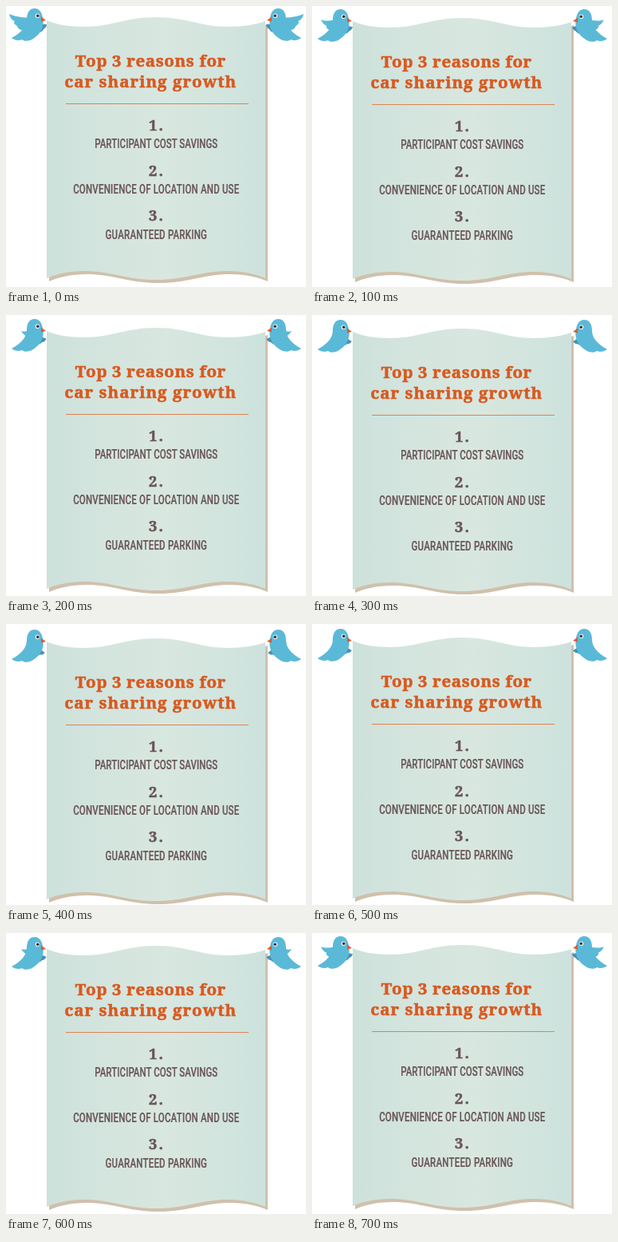
Recreate the animation shown at these times as an HTML page. Size 376 by 352 pixels, loop 800 ms.

```html
<!DOCTYPE html>
<html lang="en">
<head>
<meta charset="utf-8">
<title>Car sharing scroll</title>
<style>
  html, body { margin: 0; width: 100%; height: 100%; overflow: hidden; background: #fff; }
  svg { display: block; width: 376px; height: 352px; }
  text { text-anchor: middle; }
  .slab { font-family: "Noto Serif", "Liberation Serif", serif; font-weight: 700; }
  .title { font-size: 20.5px; fill: #d9591f; stroke: #d9591f; stroke-width: .6px; }
  .num { font-size: 18.5px; letter-spacing: 2px; fill: #6a5558; stroke: #6a5558; stroke-width: .5px; }
  .reason {
    font-family: Roboto, "Liberation Sans", sans-serif; font-weight: 500; font-size: 16.5px;
    fill: #6a5558; stroke: #6a5558; stroke-width: .25px;
  }
</style>
</head>
<body>
<svg viewBox="0 0 376 352">
  <defs>
    <linearGradient id="sheen">
      <stop offset="0" stop-color="#cde1db"/>
      <stop offset=".3" stop-color="#d4e5de"/>
      <stop offset=".55" stop-color="#d8e7df"/>
      <stop offset="1" stop-color="#cde2dd"/>
    </linearGradient>
    <path id="sheet" d="M51 18 C62 23 78 26 98 26 C132 26 150 14 188 14
      C226 14 244 26 278 26 C298 26 314 23 325 19
      V341 C314 336 298 332 278 332 C244 332 226 343 188 343
      C150 343 132 332 98 332 C78 332 62 336 51 341Z"/>
    <g id="bird">
      <path id="farWing" fill="#4a90b5" d="M34 22 L51 23 C51 26 49 28 47 29 C46 32 42 34 34 34Z"/>
      <path fill="#5bb9d8" d="M46 15 C45 7 41 3 36 3 C29 3 26 9 26 17 C26 26 18 34 7 40
        C11 43 16 44 20 42 C23 45 30 44 34 41 C42 36 46 29 46.5 23 C47 20 46.5 17 46 15Z"/>
      <path id="wing" fill="#5bb9d8" d="M37 16 C28 14 14 15 4 10 C5 15 8 18 11 19
        C9 20 10 23 14 25 C14 29 22 32 28 31 C34 30 38 25 37 16Z"/>
      <path fill="#e15a2b" d="M44 13.5 L50 18 L44 19.5Z"/>
      <circle cx="39.5" cy="12.2" r="2.8" fill="#e6f2f3"/>
      <circle cx="39.8" cy="12.2" r="1.8" fill="#3a3034"/>
    </g>
  </defs>
  <g id="scene">
    <use href="#sheet" x="3" y="4" fill="#d0c0ac"/>
    <use href="#sheet" fill="url(#sheen)"/>
    <text class="slab title" x="181.3" y="76" letter-spacing=".63">Top 3 reasons for</text>
    <text class="slab title" x="181.3" y="102" letter-spacing="1">car sharing growth</text>
    <path d="M75 122.5H304" stroke="#db8353"/>
    <g id="list"></g>
    <use href="#bird"/>
    <use href="#bird" transform="matrix(-1 0 0 1 377 0)"/>
  </g>
</svg>
<script>
  const STEP = 100, STEPS = 8;
  const CONDENSE = 0.697;
  const reasons = [
    ["PARTICIPANT COST SAVINGS", 0.06],
    ["CONVENIENCE OF LOCATION AND USE", 0.28],
    ["GUARANTEED PARKING", 0.3]
  ];
  const byId = id => document.getElementById(id);
  const scene = byId("scene"), wing = byId("wing"), farWing = byId("farWing");

  function addText(cls, str, attrs) {
    const el = document.createElementNS("http://www.w3.org/2000/svg", "text");
    el.setAttribute("class", cls);
    for (const key in attrs) el.setAttribute(key, attrs[key]);
    el.textContent = str;
    byId("list").append(el);
  }

  reasons.forEach(([label, spacing], i) => {
    const y = 155.8 + i * 56.8;
    addText("slab num", i + 1 + ".", { x: 189, y });
    addText("reason", label, {
      transform: `translate(188.3 ${y + 22.2}) scale(${CONDENSE} 1)`,
      "letter-spacing": spacing
    });
  });

  // The scroll sinks and rises a pixel per step while the wings beat
  function draw(ms) {
    const step = Math.floor(ms / STEP) % STEPS;
    const drop = Math.min(step, STEPS - step);
    const spread = Math.max(0.1, 1 - 0.3 * drop);
    scene.setAttribute("transform", `translate(0 ${drop})`);
    wing.setAttribute("transform",
      `translate(36 22) rotate(${-15 * drop}) scale(${spread} 1) translate(-36 -22)`);
    farWing.setAttribute("transform", `rotate(${9 * drop} 36 24)`);
  }

  const start = performance.now();
  function tick() {
    draw(performance.now() - start);
    requestAnimationFrame(tick);
  }
  tick();
</script>
</body>
</html>
```
